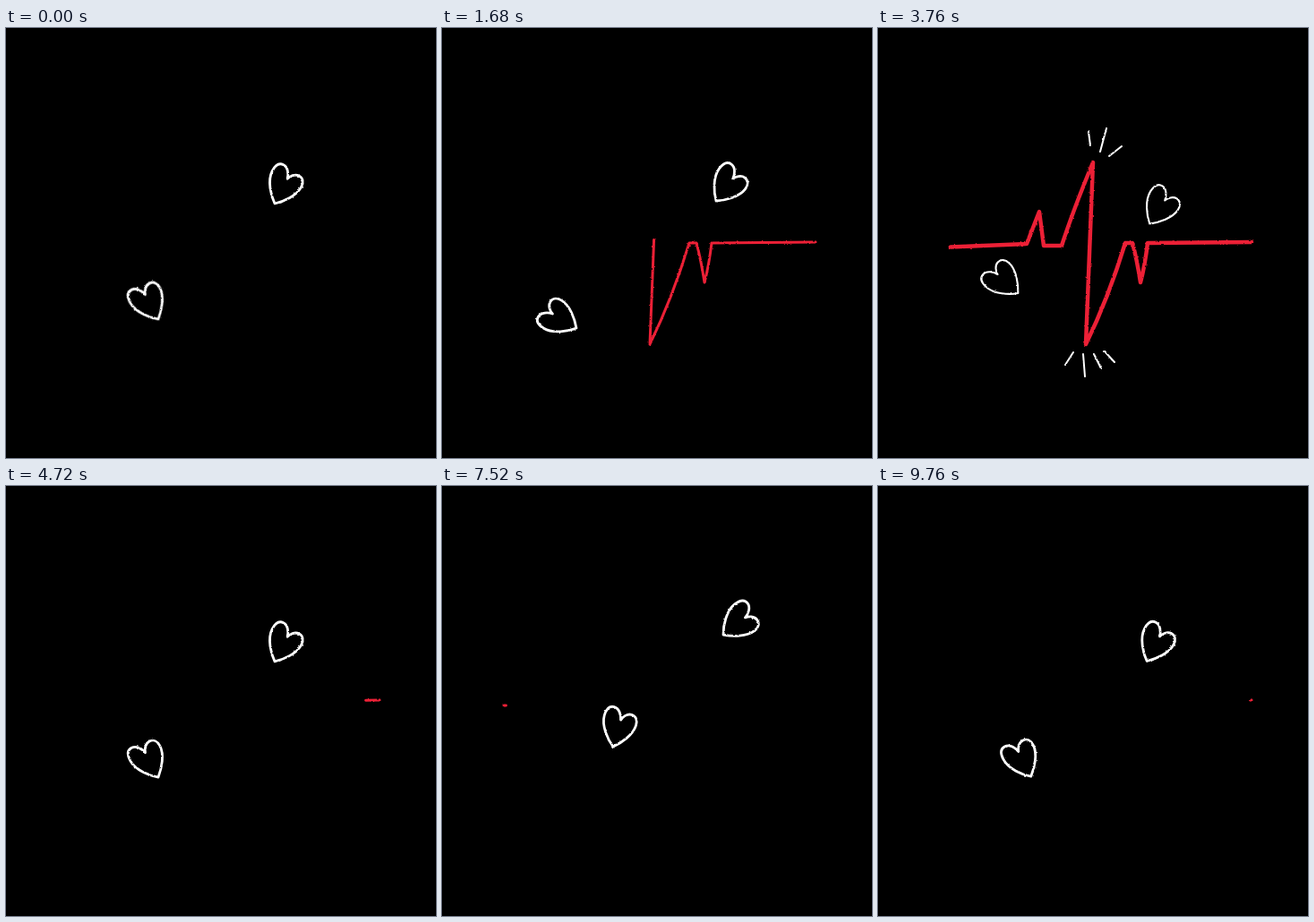
An HTML page that plays this animation: 480 by 480 pixels, repeating every 9.84 s.

```html
<!DOCTYPE html>
<html>
<head>
<meta charset="utf-8">
<title>Heartbeat</title>
<style>
html, body { margin: 0; width: 100%; height: 100%; overflow: hidden; background: #000; }
svg { display: block; width: 100vw; height: 100vh; }
path { fill: none; stroke: #fff; stroke-width: 2; stroke-linejoin: round; stroke-linecap: round; }
#pulse { stroke: #ec2036; }
</style>
</head>
<body>
<svg viewBox="0 0 480 480">
  <filter id="rough" filterUnits="userSpaceOnUse" x="0" y="0" width="480" height="480" color-interpolation-filters="sRGB">
    <feTurbulence type="fractalNoise" baseFrequency=".35" numOctaves="2" seed="4"/>
    <feDisplacementMap in="SourceGraphic" scale="2.2" xChannelSelector="R" yChannelSelector="G"/>
  </filter>
  <g filter="url(#rough)">
    <path id="pulse" d="M69 245L166 241L180 205L185 243H205Q218 203 240 150L232 353Q257 302 276 240H284Q289 258 293 284Q298 265 301 240L417 239"/>
    <path id="topRays" d="M237 131L235 116M248 138L255 112M258 143L272 132"/>
    <path id="bottomRays" d="M218 362L209 376M229 364L231 389M241 364L249 380M253 361L264 373"/>
    <path class="heart"/>
    <path class="heart"/>
  </g>
</svg>
<script>
const LOOP = 9840, BEAT = LOOP / 4, RAY_LENGTH = 27;
const [pulse, topRays, bottomRays] = ['pulse', 'topRays', 'bottomRays'].map(id => document.getElementById(id));
const hearts = document.querySelectorAll('.heart');

// Tip at the origin, left lobe a little larger than the right
const heartShape = 'M0 0C-8-6-19-19-19-31C-19-39-16-43-11-43C-5-43-1-36 0-31' +
  'C1-35 5-40 10-40C15-40 18-36 18-30C18-19 8-7 0 0Z';
hearts.forEach(heart => heart.setAttribute('d', heartShape));

// Both hearts drift through a few poses (tip x, tip y, tilt) and pass home twice per loop
const poseTimes = [0, 1680, 2800, 4720, 6080, 7520, LOOP];
const drift = (home, a, b, c, d) => [home, a, b, home, c, d];
const tracks = [
  drift([300, 196, 27], [306, 193, 37], [306, 231, 37], [295, 153, 11], [314, 166, 52]),
  drift([170, 325, -28], [150, 335, -59], [143, 276, -67], [166, 338, -39], [191, 291, 16])
];

const clamp = u => Math.min(1, Math.max(0, u));
const smooth = u => (u = clamp(u), u * u * (3 - 2 * u));
const ramp = (t, start, duration) => smooth((t - start) / duration);

// Cyclic Catmull-Rom spline
function poseAt(track, t) {
  const i = poseTimes.findIndex(time => time > t) - 1;
  const u = (t - poseTimes[i]) / (poseTimes[i + 1] - poseTimes[i]);
  const [p, q, r, s] = [-1, 0, 1, 2].map(k => track[(i + k + track.length) % track.length]);
  return q.map((value, c) => value + u / 2 * (r[c] - p[c] +
    u * (2 * p[c] - 5 * value + 4 * r[c] - s[c] + u * (3 * (value - r[c]) + s[c] - p[c]))));
}

// Shows only the part of each stroke between two fractions of the length
function trim(path, from, to, length) {
  path.style.display = to - from > .0005 ? '' : 'none';
  path.style.strokeDasharray = `${(to - from) * length} ${length * 2}`;
  path.style.strokeDashoffset = -from * length;
}

function draw(t) {
  const beat = t % BEAT;
  const swell = ramp(beat, 650, 350) - ramp(beat, 1400, 280);
  const erased = smooth(1 - (1 - clamp((beat - 1240) / 1240)) ** 1.45);

  trim(pulse, erased, ramp(beat, 105, 1140), pulse.getTotalLength());
  trim(topRays, ramp(beat, 1380, 160), ramp(beat, 530, 150), RAY_LENGTH);
  trim(bottomRays, ramp(beat, 1460, 160), ramp(beat, 860, 150), RAY_LENGTH);
  pulse.style.strokeWidth = 3 + 1.5 * swell;

  hearts.forEach((heart, i) => {
    const [x, y, tilt] = poseAt(tracks[i], t);
    heart.setAttribute('transform', `translate(${x} ${y}) rotate(${tilt})`);
    heart.style.strokeWidth = 2.8 - .7 * swell;
  });
}

const began = performance.now();
function tick() {
  draw((performance.now() - began) % LOOP);
  requestAnimationFrame(tick);
}
tick();
</script>
</body>
</html>
```
